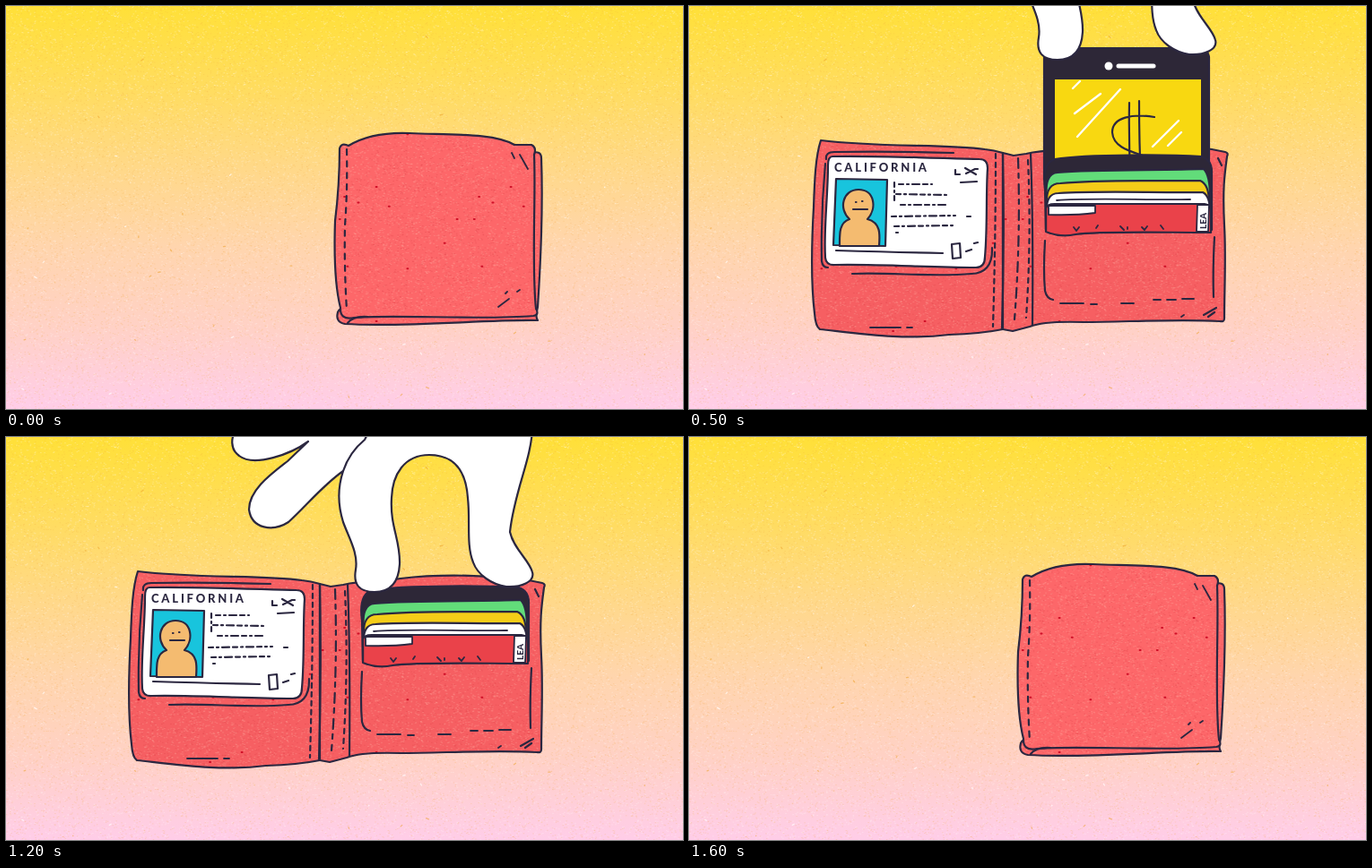
Animation, 755 px wide and 450 px high, one loop 1700 ms. Source, as an HTML page:

```html
<!DOCTYPE html>
<html lang="en">
<head>
<meta charset="utf-8">
<title>Wallet</title>
<style>
  html, body { margin: 0; width: 100%; height: 100%; overflow: hidden; }
  svg { display: block; width: 755px; height: 450px; fill: none; stroke: #2b2740; stroke-width: 2.2;
        stroke-linecap: round; stroke-linejoin: round; }
  .leather { fill: url(#leather); }
  .white { fill: #fff; }
  .dark { fill: #2d2737; }
  .thin { stroke-width: 1.8; }
  .glare { stroke: #fff; stroke-width: 2.3; }
  text { fill: #2b2740; stroke: none; font: 800 13px Lato, sans-serif; }
</style>
</head>
<body>
<svg viewBox="0 0 755 450">
  <defs>
    <linearGradient id="sky" x2="0" y2="1">
      <stop stop-color="#ffe038"/>
      <stop offset=".22" stop-color="#ffdc62"/>
      <stop offset=".42" stop-color="#ffd88c"/>
      <stop offset=".6" stop-color="#ffd5ae"/>
      <stop offset=".8" stop-color="#ffd1c6"/>
      <stop offset=".95" stop-color="#ffcee0"/>
      <stop offset="1" stop-color="#ffcde8"/>
    </linearGradient>
    <pattern id="paper" width="251" height="225" patternUnits="userSpaceOnUse">
      <path class="grain" stroke="#fff" stroke-opacity=".25" data-count="2400"/>
      <path class="grain" stroke="#f0a030" stroke-opacity=".18" data-count="2400"/>
    </pattern>
    <pattern id="leather" width="150" height="150" patternUnits="userSpaceOnUse">
      <rect id="hide" width="150" height="150" stroke="none"/>
      <path class="grain" stroke="#ffb0a0" stroke-opacity=".28" data-count="1500"/>
      <path class="grain" stroke="#d8323c" stroke-opacity=".25" data-count="1000"/>
      <path class="grain" stroke="#d01028" stroke-width="2" data-count="9"/>
    </pattern>
    <clipPath id="aboveSlot"><path d="M0-20H755V172H582V194H394V172H0z"/></clipPath>
  </defs>

  <rect width="755" height="450" fill="url(#sky)" stroke="none"/>
  <rect width="755" height="450" fill="url(#paper)" stroke="none"/>
  <path class="specks" stroke="#fff" stroke-opacity=".7" stroke-width="1.3" data-count="22"/>
  <path class="specks" stroke="#eda22e" stroke-opacity=".55" stroke-width="1.3" data-count="28"/>

  <g id="closed">
    <path class="leather" d="M586 164Q597 161 597 170C599 225 596 290 593 336Q590 348 593 351C535 350 445 359 378 355Q367 353 370 342Q372 337 377 338L586 340z"/>
    <path class="leather" d="M372 159Q374 152 382 156C400 145 425 141 450 142C500 144 545 142 567 155L586 155Q592 158 589 166C591 215 586 290 591 338Q595 345 588 346C530 351 430 344 388 348Q372 351 373 337C366 310 366 270 367 240Q372 200 372 159z"/>
    <path d="M381 354Q387 346 403 347"/>
    <path stroke-dasharray="6 7" d="M380 160Q381 205 378 245Q377 290 380 340"/>
    <path class="thin" d="M564 164l3 6M573 166l9 16M549 336l12-9M557 321l2-2M570 319l3-2"/>
  </g>

  <g id="open">
    <g id="flap">
      <path class="leather" d="M147 150C141 168 140 195 139 225C137 260 136 310 140 343Q141 358 146 361C200 367 240 373 290 367Q325 366 350 361L350 164Q340 161 330 160C285 154 210 158 147 150z"/>
      <path d="M153 171Q152 163 162 163Q230 162 295 164M152 176Q147 230 148 285Q149 292 155 292M182 299C225 297 270 303 315 299Q339 298 338 270"/>
      <path class="white" d="M160 168Q155 168 155 178C155 212 150 250 152 281Q153 290 163 289C215 288 265 292 320 292Q330 292 330 280C333 247 331 212 333 181Q333 171 324 171C280 170 210 167 160 168z"/>
      <text x="162" y="185" letter-spacing="2.8">CALIFORNIA</text>
      <path d="M297 183v5h5M308 181l12 7M309 187l10-5h3M303 197l18-1"/>
      <path fill="#18c4dd" d="M164 193L221 194L219 268L161 267z"/>
      <path fill="#f4bb70" d="M179 238C166 226 172 205 189 205C207 205 210 226 199 238C214 242 213 255 212 268H168C168 255 167 242 179 238z"/>
      <path d="M183 227h16M186 219h.5M193 218h.5"/>
      <path stroke-dasharray="5 4 2 4 8 4" d="M229 197v20M234 199h37M231 210l56 1M236 222h50M226 235l71-1M229 246l68-1M231 253h2M310 235h4"/>
      <path d="M164 273Q230 275 283 276M293 266l9-1l1 16l-9 1zM309 274l6-2M318 265l4-1"/>
      <path class="thin" d="M202 359h34M243 359h6"/>
      <path stroke-dasharray="5 5" d="M342 165Q342 260 339 358"/>
    </g>

    <path class="leather" d="M350 164L362 167L376 165C400 159 420 162 440 158C490 152 545 155 583 160L598 163Q602 164 600 168C597 190 595 205 597 245C599 280 597 315 597 349Q597 353 592 352C545 349 485 353 440 353C410 352 390 354 380 358L361 363L350 361z"/>
    <path d="M381 165Q384 240 383 356M350 164Q352 260 349 361"/>
    <path stroke-dasharray="11 6 5 7" d="M367 170Q370 260 363 350"/>
    <path stroke-dasharray="5 6" d="M378 172Q382 260 376 348"/>
    <path d="M397 262Q395 295 397 318Q399 327 406 328M586 258Q584 295 585 325M590 170l4 8M574 345l14-8M579 347l7-5"/>
    <path class="thin" d="M414 332h26M448 333h7M482 332h14M518 328h8M533 328h10M550 327h13M549 347l3-2"/>

    <g clip-path="url(#aboveSlot)">
      <g id="phone">
        <rect class="dark" x="396" y="47" width="184" height="330" rx="11"/>
        <rect x="408" y="82" width="163" height="250" fill="#f8d811" stroke="none"/>
        <circle class="white" cx="468" cy="67" r="4.5" stroke="none"/>
        <path stroke="#fff" stroke-width="5" d="M479 67H518"/>
        <path d="M491 108Q490 165 494 217M502 106Q502 165 505 212M519 124C495 120 472 124 472 141C473 156 488 161 503 166C527 172 527 184 517 194C507 202 490 202 472 201"/>
        <path id="glareLow" class="glare" d="M428 92l8-8M430 120l29-22M433 146l48-53M517 157l29-29M534 156l15-15"/>
        <path id="glareHigh" class="glare" d="M437 104l13-13M452 104l14-13M430 242l78-90M458 202l64-51M470 201l52-38M508 240l30-31M528 235l21-26"/>
      </g>
    </g>
    <path class="dark" d="M397 205Q393 176 408 171C445 165 540 166 572 168Q583 172 583 185V250H398z"/>

    <path fill="#62dc7a" d="M399 215Q396 187 411 186C455 182 530 184 574 182Q581 189 581 213z"/>
    <path fill="#f5cd18" d="M399 220Q398 198 414 198C465 193 525 196 570 195Q580 199 580 220z"/>
    <path class="white" d="M399 233Q397 209 412 209C465 206 525 209 573 208Q581 212 581 230z"/>
    <path class="thin" d="M410 217C450 214 510 217 559 216"/>
    <path fill="#ea424a" d="M398 252V226Q399 221 408 221H575Q582 222 582 230V253C530 253 460 251 431 255Q415 259 398 252z"/>
    <path class="white thin" d="M401 223H453V231Q430 234 401 233zM567 222H580L579 252H566z"/>
    <text transform="translate(577 249) rotate(-90)" style="font-size:10px">LEA</text>
    <path class="thin" d="M429 247l3 4l3-4M456 245l-2 3M481 246l4 4M489 247v2M505 247l3 3l3-4M526 245l3 4"/>
    <path d="M398 195V250"/>
  </g>

  <path id="hand" class="white" d="M587-10C586 25 567 60 562 106C566 125 584 138 587 151C590 162 574 168 558 167C542 165 526 154 521 140C513 120 518 95 515 68C513 38 500 20 472 20C444 20 431 42 430 68C428 100 440 115 439 142C438 160 431 173 411 173C394 173 387 165 390 148C393 130 383 114 376 95C370 76 370 56 376 38C353 54 333 79 315 95C298 106 274 103 271 81C271 59 296 41 314 27L337 5C318 19 277 34 260 21C250 14 250 0 258-10L270-260H590z"/>
  <path id="knuckle" d="M376 38Q383 17 400 3L412-20"/>
</svg>
<script>
const $ = id => document.getElementById(id);
const STEP = 100, STEPS = 17;
// Vertical offsets by pose: closed, half open, open, reach, grip, pull, pull, hold
const phoneY = [0, 0, 0, 0, 113, 0, -94, -124];
const handY = [0, 0, 0, -100, 0, -113, -207, -237];

let seed = 7;
const random = () => (seed = seed * 16807 % 2147483647) / 2147483647;

function scatter(selector, width, height, mark) {
  for (const path of document.querySelectorAll(selector)) {
    let d = '';
    for (let i = 0; i < path.dataset.count; i++)
      d += `M${(random() * width).toFixed(1)} ${(random() * height).toFixed(1)}${mark()}`;
    path.setAttribute('d', d);
    if (!path.hasAttribute('stroke-width')) path.setAttribute('stroke-width', 1);
  }
}
scatter('#paper .grain', 251, 225, () => 'h.7');
scatter('#leather .grain', 150, 150, () => 'h1');
scatter('.specks', 755, 450, () => `l${(random() * 5 - 2).toFixed(1)} ${(random() * 4 - 2).toFixed(1)}`);

const show = (id, on) => $(id).style.display = on ? '' : 'none';
const moveY = (id, y) => $(id).setAttribute('transform', `translate(0 ${y})`);

function draw(now) {
  const step = Math.floor(now / STEP) % STEPS;
  const pose = Math.min(step, 7, STEPS - 1 - step);   // the way back mirrors the way in
  show('closed', pose === 0);
  show('open', pose > 0);
  show('phone', pose > 4);
  show('glareLow', pose === 5);
  show('glareHigh', pose > 5);
  $('flap').setAttribute('transform', pose === 1 ? 'matrix(.45 .1 0 1 192.5 -35)' : '');
  $('hide').setAttribute('fill', pose ? '#f65f62' : '#fd6769');
  moveY('phone', phoneY[pose]);
  for (const id of ['hand', 'knuckle']) {
    show(id, pose > 2);
    moveY(id, handY[pose]);
  }
}

const start = performance.now();
function tick() {
  draw(performance.now() - start);
  requestAnimationFrame(tick);
}
tick();
</script>
</body>
</html>
```
